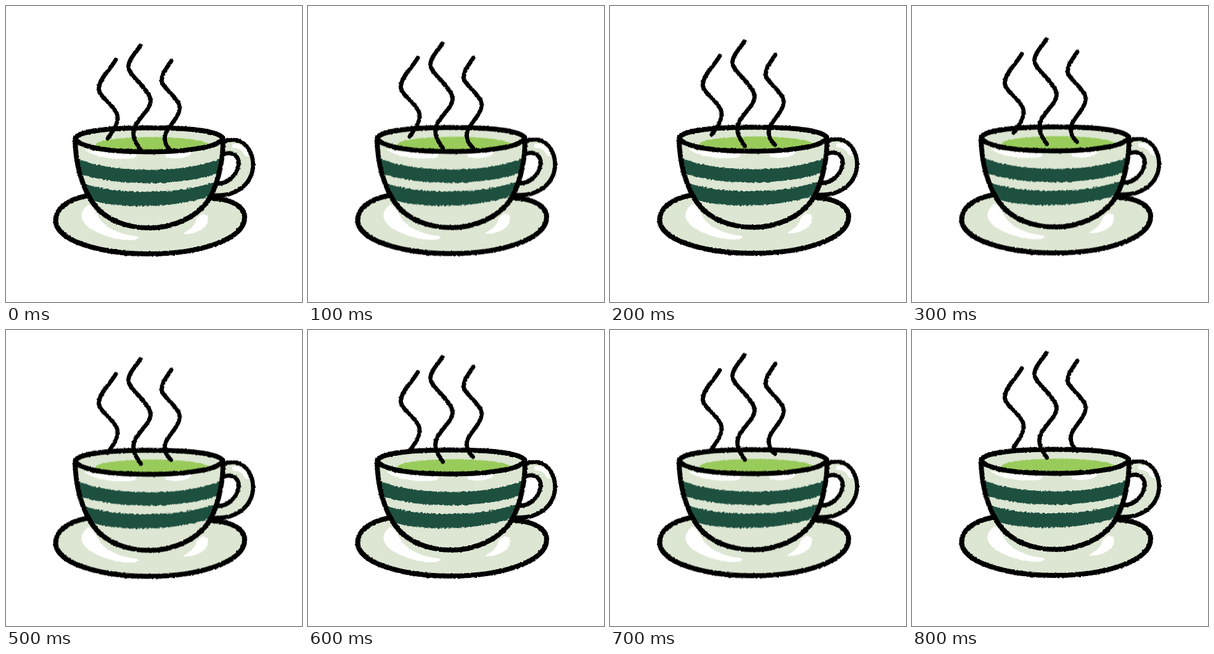
Recreate the animation shown at these times as an HTML page. Size 480x480 px, loop 1300 ms.

```html
<!DOCTYPE html>
<html lang="en">
<head>
<meta charset="utf-8">
<title>Cup of tea</title>
<style>
  html, body { margin: 0; width: 100%; height: 100%; overflow: hidden; background: #fff; }
  svg { display: block; width: 100%; height: 100%; }
  .ink { fill: none; stroke: #000; stroke-width: 8; stroke-linecap: round; stroke-linejoin: round; }
  .thin { stroke-width: 6.8; }
  .china { fill: #dce6d2; }
  .shine { fill: #fff; }
  .tea { fill: #99cb5b; }
  .band { fill: #1e5040; }
</style>
</head>
<body>
<svg viewBox="0 0 480 480">
  <defs>
    <filter id="crayon" filterUnits="userSpaceOnUse" x="0" y="0" width="480" height="480" color-interpolation-filters="sRGB">
      <feTurbulence type="fractalNoise" baseFrequency=".3" numOctaves="2" seed="4"/>
      <feDisplacementMap in="SourceGraphic" scale="2.8" xChannelSelector="R" yChannelSelector="G"/>
    </filter>
    <filter id="chalk" filterUnits="userSpaceOnUse" x="0" y="0" width="480" height="480" color-interpolation-filters="sRGB">
      <feTurbulence type="fractalNoise" baseFrequency=".28" numOctaves="3" seed="9"/>
      <feDisplacementMap in="SourceGraphic" scale="4.5" xChannelSelector="R" yChannelSelector="G"/>
    </filter>
    <path id="saucer" d="M130 308C104 313 81 327 80.500 347C80 380 150 402 232 402C310 402 388 380 387 342C386 325 365 313 336 312"/>
    <path id="body" d="M112 217C113 255 122 290 140 318C160 347 195 360 235 360C270 359 305 345 326 318C341 297 352 258 352 217"/>
    <path id="rim" d="M112.500 214C120 202 175 197.500 232 197.500C290 197.500 344 202 351.500 214C349 229 290 236.500 232 236.500C165 236.500 116 229 112.500 214Z"/>
    <path id="grip" d="M353 220C384 208 403 235 400.500 263C396 291 372 309 339 307"/>
    <path id="hole" d="M351 241C368 234 379 244 377 258C374 275 360 288 343 288"/>
    <clipPath id="inRim"><use href="#rim"/></clipPath>
    <clipPath id="inBody"><use href="#body"/></clipPath>
  </defs>

  <g data-rise="4">
    <use href="#saucer" class="china"/>
    <g class="shine" filter="url(#crayon)">
      <path d="M133 322C118 335 118 350 140 363C165 377 195 382 212 379C217 376 214 373 208 373C185 370 162 360 152 345C145 335 142 325 133 322Z"/>
      <path d="M288 368C302 361 308 352 309 345C316 336 326 335 328 343C330 356 315 370 288 370Z"/>
    </g>
    <use href="#grip" class="china"/>
    <use href="#hole" class="shine"/>
    <path class="shine" d="M367 224C380 222 391 229 394 243C390 246 387 242 384 237C380 231 374 231 367 230Z"/>
    <use href="#body" class="china"/>
    <g clip-path="url(#inBody)">
      <g class="band" filter="url(#chalk)">
        <path d="M115 247C160 268 280 276 352 246L347 270C290 291 190 294 120 273Z"/>
        <path d="M124 287C175 306 285 307 344 283L335 306C285 327 185 331 136 314Z"/>
      </g>
      <g class="shine" filter="url(#crayon)">
        <path d="M127 232C150 238 180 239 210 238Q214 245 206 247C175 250 140 245 127 232Z"/>
        <path d="M258 238L302 234Q303 241 291 245Q270 250 259 244Z"/>
      </g>
    </g>
    <use href="#rim" class="china"/>
    <g clip-path="url(#inRim)">
      <ellipse class="tea" cx="237" cy="225.500" rx="92" ry="13" filter="url(#crayon)"/>
    </g>
  </g>

  <g data-rise="25">
    <path class="ink thin" filter="url(#crayon)" d="M178 87C169 104 150.500 118 150.500 135C150.500 148 181 164 181 181C181 195 169 208 165 215"/>
  </g>
  <g data-rise="27">
    <path class="ink thin" filter="url(#crayon)" d="M218 64C211 76 198.500 86 198.500 99C198.500 113 234.500 136 234.500 154C233.500 172 207 186 206.500 206C206.500 218 214 226 218.500 234"/>
  </g>
  <g data-rise="39">
    <path class="ink thin" filter="url(#crayon)" d="M268 89C261 101 252.500 108 252.500 121C252.500 133 281.500 149 281.500 165C281.500 183 257.500 198 257.500 214C257.500 226 263 229 267.500 235"/>
  </g>

  <g data-rise="4">
    <g class="ink" filter="url(#crayon)">
      <use href="#saucer"/>
      <use href="#grip" class="thin"/>
      <use href="#hole" class="thin"/>
      <use href="#body"/>
      <use href="#rim"/>
    </g>
  </g>
</svg>
<script>
  const LOOP = 1300, RISE_END = 800, STEPS = 8;

  // Rise in hard steps, then hold until the loop restarts.
  for (const part of document.querySelectorAll('[data-rise]')) {
    const top = `translate(0px, ${-part.dataset.rise}px)`;
    part.animate([
      { transform: 'translate(0px, 0px)', easing: `steps(${STEPS}, end)` },
      { transform: top, offset: RISE_END / LOOP },
      { transform: top }
    ], { duration: LOOP, iterations: Infinity });
  }
</script>
</body>
</html>
```
